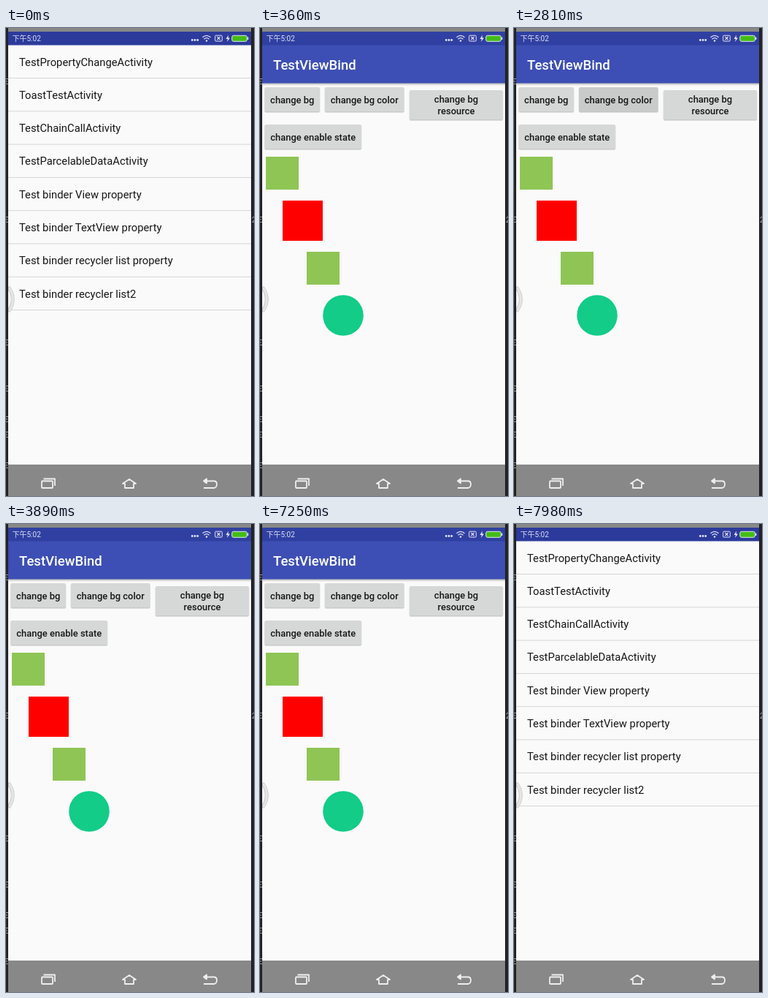
An HTML page that plays this animation: 340x640 px, repeating every 8000 ms.

```html
<!DOCTYPE html>
<html lang="en">
<head>
<meta charset="utf-8">
<title>View binding demo</title>
<style>
html, body { margin: 0; height: 100%; overflow: hidden; background: #222; }
svg { display: block; }
text { font-family: Roboto, "Noto Sans CJK SC", sans-serif; }
#list text { font-size: 14.8px; fill: #161616; }
#page text { font-weight: 500; font-size: 12.95px; fill: #161616; text-anchor: middle; }
#page .title { font-size: 18.5px; fill: #fff; text-anchor: start; }
</style>
</head>
<body>
<svg width="340" height="640" viewBox="0 0 340 640">
  <defs>
    <linearGradient id="shade" x2="0" y2="1">
      <stop stop-opacity=".3"/><stop offset="1" stop-opacity="0"/>
    </linearGradient>
  </defs>

  <g id="list"><rect x="3" y="23" width="500" height="574" fill="#fafafa"/></g>
  <rect id="dim" x="3" y="23" width="333" height="574"/>

  <g id="page">
    <rect x="3" y="23" width="333" height="574" fill="#fafafa"/>
    <rect x="3" y="75" width="333" height="4" fill="url(#shade)"/>
    <rect x="3" y="23" width="333" height="52.5" fill="#3d4fb4"/>
    <text class="title" x="18" y="56.5">TestViewBind</text>
    <g id="buttons"></g>
    <rect id="icon1" x="8" y="176" width="45" height="45" fill="#8fc555"/>
    <circle id="round1" cx="30.5" cy="199.5" r="25" fill="#8fc555"/>
    <rect id="square" x="31" y="236" width="55" height="55"/>
    <rect id="icon2" x="64" y="306" width="45" height="45" fill="#8fc555"/>
    <circle id="round2" cx="86.5" cy="328.5" r="25" fill="#8fc555"/>
    <circle id="dot" cx="114" cy="393" r="27.8"/>
  </g>

  <path d="M4.500 356Q14 371 4.500 386" fill="none" stroke="#bbb" stroke-opacity=".75" stroke-width="5" stroke-linecap="round"/>
  <path d="M5 356Q13.500 371 5 386" fill="none" stroke="#e6e6e6" stroke-width="3" stroke-linecap="round"/>

  <rect id="status" x="3" y="5" width="333" height="18.500"/>
  <text x="8.500" y="18.300" font-size="10" fill="#dde0f2">下午5:02</text>
  <g fill="#e4e6f5">
    <circle cx="255.300" cy="16.500" r="1.400"/><circle cx="259" cy="16.500" r="1.400"/><circle cx="262.700" cy="16.500" r="1.400"/>
    <circle cx="275" cy="17.500" r="1.200"/>
    <path d="M305 9.500l-3.500 5.500h2.500l-1 4 4-5.500h-2.500z"/>
  </g>
  <g fill="none" stroke="#e4e6f5" stroke-width="1.300">
    <path d="M269.500 12.800Q275 8 280.500 12.800M271.500 15.300Q275 12 278.500 15.300"/>
    <rect x="286.700" y="10.200" width="9.600" height="7.800" rx="1" stroke-width="1"/>
    <path d="M289.500 12l4 4m0-4l-4 4" stroke-width="1.100"/>
    <rect x="309.800" y="10.300" width="20.500" height="8" rx="2" fill="#43bd16" stroke-width="1"/>
    <path d="M331.700 12.500v3.500"/>
  </g>

  <path d="M3 0H336V5H3zM3 597H336V640H3z" fill="#888"/>
  <g fill="none" stroke="#eee" stroke-width="1.800" stroke-linejoin="round">
    <rect x="49" y="619.500" width="15" height="9.500" rx="1"/>
    <path d="M51.500 616.500H67V626"/>
    <path d="M160 623L169 617L178 623H175V629H163V623z"/>
    <path d="M272 619.500H285Q289 619.500 289 624T285 629H271"/>
    <path d="M275 616.500L271 619.500L275 622.500z" fill="#eee"/>
  </g>

  <path d="M0 0H3V640H0zM336 0H340V640H336z" fill="#232325"/>
  <g id="marks" stroke="#999" stroke-width="1"></g>
  <text x="337" y="266" font-size="10" fill="#aaa">2</text>
</svg>
<script>
const $ = id => document.getElementById(id);

const items = ["TestPropertyChangeActivity", "ToastTestActivity", "TestChainCallActivity",
  "TestParcelableDataActivity", "Test binder View property", "Test binder TextView property",
  "Test binder recycler list property", "Test binder recycler list2"];
$("list").innerHTML += items.map((label, i) => {
  const y = 23 + i * 45.3;
  return `<text x="18" y="${y + 28.5}">${label}</text>
    <rect x="3" y="${y + 45}" width="500" height="1" fill="#d6d6d6"/>`;
}).join("");

// Presses are [start, end] in ms; cx, cy is the touch point.
const buttons = [
  { x: 6.5, y: 81, w: 75.5, h: 33.5, lines: ["change bg"], cx: 40, cy: 98,
    presses: [[1010, 1190], [1640, 2000]] },
  { x: 89, y: 81, w: 108.5, h: 33.5, lines: ["change bg color"], cx: 143, cy: 98,
    presses: [[2180, 2450], [2450, 2990]] },
  { x: 205, y: 85, w: 128, h: 40.5, lines: ["change bg", "resource"], cx: 268, cy: 105,
    presses: [[2990, 3170], [3350, 3710], [6170, 6350], [6530, 6800]] },
  { x: 6.5, y: 132, w: 132.5, h: 33.5, lines: ["change enable state"], cx: 90, cy: 149,
    presses: [[4350, 4620], [4710, 5070]] }
];
$("buttons").innerHTML = buttons.map((b, i) => {
  const box = `x="${b.x}" y="${b.y}" width="${b.w}" height="${b.h}" rx="2"`;
  const mid = b.x + b.w / 2;
  const top = b.lines.length > 1 ? 17.3 : 21.8;
  return `<clipPath id="clip${i}"><rect ${box}/></clipPath>
    <rect ${box} transform="translate(0 1)" fill="#bbb" stroke="#ddd"/>
    <rect ${box} fill="#d6d7d7"/>
    <rect ${box} id="press${i}" opacity=".06"/>
    <circle id="ripple${i}" cx="${b.cx}" cy="${b.cy}" opacity=".07" clip-path="url(#clip${i})"/>` +
    b.lines.map((s, n) => `<text x="${mid}" y="${b.y + top + n * 15.2}">${s}</text>`).join("");
}).join("");

$("marks").innerHTML = [73, 262, 430, 493, 535, 556, 598].map(y =>
  `<path d="M0 ${y - 3.5}h3m-3 3.500h2m-2 3.500h3"/>`).join("");

const STEP = 90;
const within = (t, ...spans) => spans.some(([a, b]) => t >= a && t < b);
const show = (id, on) => $(id).setAttribute("visibility", on ? "visible" : "hidden");
const move = (id, x) => $(id).setAttribute("transform", `translate(${x} 0)`);

function slide(age) {
  if (age < 0) return 0;
  const u = Math.min(1, 0.31 + 0.25 * Math.floor(age / STEP));
  return 1 - (1 - u) ** 3;
}

function draw(t) {
  const open = slide(t - 90) - slide(t - 7710);
  move("list", -150 * open);
  move("page", 333 * (1 - open));
  $("dim").setAttribute("opacity", 0.25 * Math.sqrt(open));
  $("status").setAttribute("fill", open > 0.5 ? "#3040a2" : "#2c3a9c");

  buttons.forEach((b, i) => {
    const press = b.presses.find(p => within(t, p));
    const age = press ? Math.floor((t - press[0]) / STEP) * STEP : 0;
    show("press" + i, press);
    show("ripple" + i, press && age < 360);
    $("ripple" + i).setAttribute("r", 8 + age * 0.055);
  });

  const round1 = within(t, [1100, 1640]);
  const round2 = within(t, [3080, 3440], [6260, 6620]);
  show("icon1", !round1);
  show("round1", round1);
  show("icon2", !round2);
  show("round2", round2);
  $("square").setAttribute("fill", within(t, [2270, 2630]) ? "#00f" : "#f00");
  $("dot").setAttribute("fill", within(t, [4440, 4890]) ? "#999" : "#12cc88");
}

const start = performance.now();
function tick() {
  draw((performance.now() - start) % 8000);
  requestAnimationFrame(tick);
}
tick();
</script>
</body>
</html>
```
